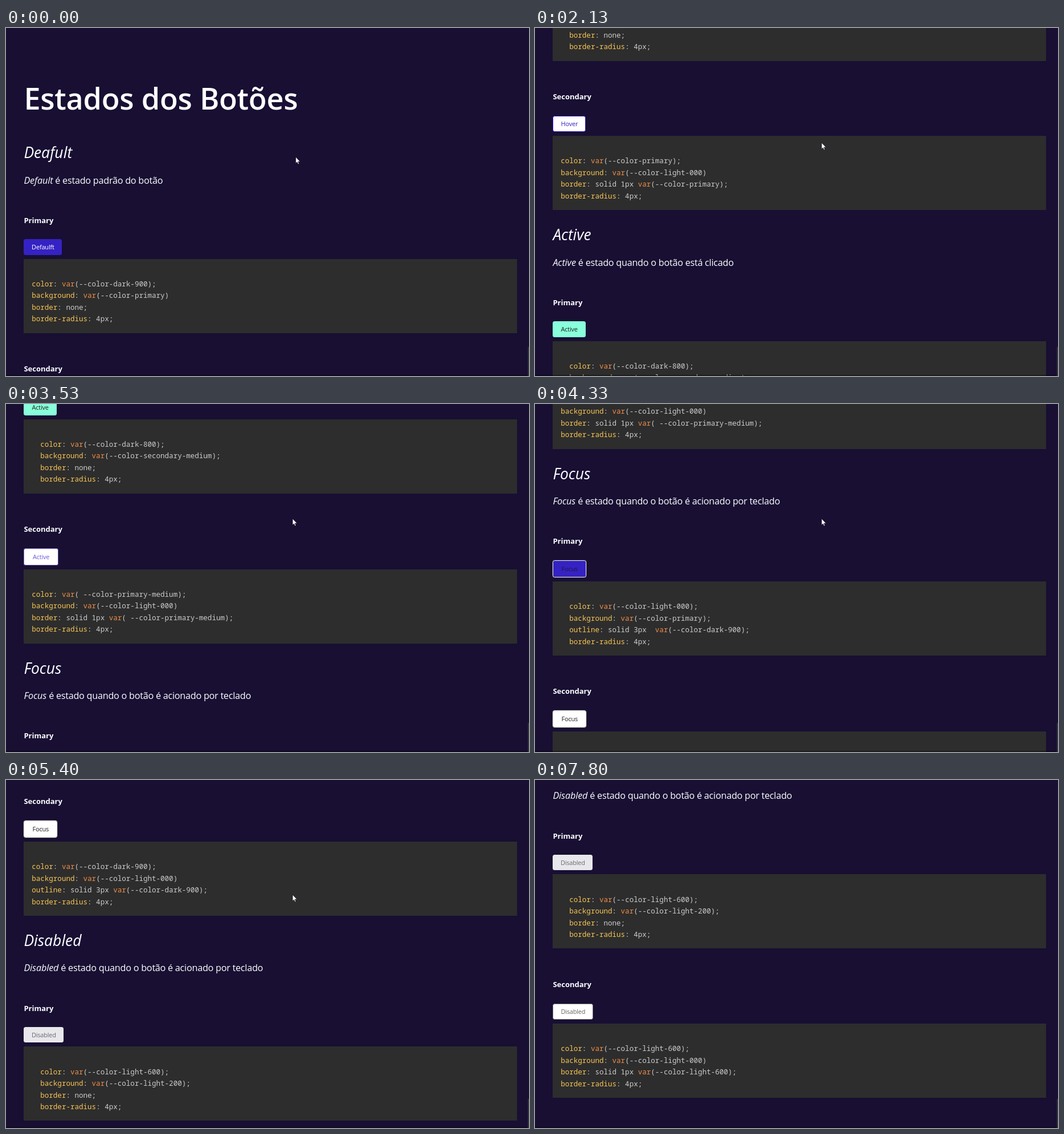
An HTML page for the animation above (8.19 s loop, 918 by 610 pixels).

```html
<!DOCTYPE html>
<html lang="pt">
<head>
<meta charset="utf-8">
<style>
  html, body { margin: 0; width: 100%; height: 100%; overflow: hidden; background: #180f33; }
  body { position: relative; color: #fff; font-family: "Open Sans", "Noto Sans", sans-serif; }
  #page { position: absolute; left: 0; top: 0; width: 918px; }
  #page > * { position: absolute; left: 31.4px; margin: 0; white-space: pre; }
  h1, h2, h3, p { line-height: 40px; }
  h1 { font-size: 52px; font-weight: 600; letter-spacing: -.2px; }
  h2 { font-size: 26.5px; font-weight: 400; font-style: italic; }
  h3 { font-size: 13px; font-weight: 700; }
  p { font-size: 16.2px; letter-spacing: -.25px; }
  p em { letter-spacing: -.1px; }
  .btn { box-sizing: border-box; display: flex; align-items: center; justify-content: center;
    border-radius: 3.5px; font-size: 11px; letter-spacing: -.2px; }
  pre { box-sizing: border-box; width: 866px; height: 130px; padding: 34.3px 0 0 13.8px;
    background: #2d2d2d; color: #ccc; font: 12.55px/20.55px "Noto Sans Mono", monospace; }
  pre b { font-weight: 400; color: #f8c555; }
  pre i { font-style: normal; color: #f08d49; }
  #cursor { position: absolute; left: 0; top: 0; overflow: visible; }
  #floor, #thumb { position: absolute; }
  #floor { left: 0; top: 608px; width: 918px; height: 2px; background: rgba(0, 0, 0, .35); }
  #thumb { left: 916px; top: 559px; width: 2px; height: 51px; background: #34323c; }
</style>
</head>
<body>
<div id="page"></div>
<div id="floor"></div>
<div id="thumb"></div>
<svg id="cursor" width="10" height="15">
  <path d="M0 0V11.2L2.5 8.9 4.2 12.8 6 12 4.3 8.2H7.8Z" fill="#fff" stroke="#0b0718" stroke-width=".7"/>
</svg>
<script>
const page = document.getElementById('page');
const cursor = document.getElementById('cursor');

const add = (tag, top, html, style = '', cls = '') => page.insertAdjacentHTML('beforeend',
  `<${tag} class="${cls}" style="top:${top}px;${style}">${html}</${tag}>`);
// Text line of 40px height, centred on y
const line = (tag, y, html) => add(tag, y - 20, html);

const highlight = code => code
  .replace(/\bvar\b/g, '<i>var</i>')
  .replace(/^( *)([\w-]+)(?=:)/gm, '$1<b>$2</b>');
const rules = (indent, color, background, third) => highlight(
  [`color: ${color}`, `background: ${background}`, third, 'border-radius: 4px;']
    .map(s => ' '.repeat(indent) + s).join('\n'));
const v = name => `var(--color-${name})`;
const light = v('light-000');

const H = 27.4, edge = 'border:1px solid ';
const ring = 'border:1.5px solid #e8e8ea;box-shadow:0 0 0 1px #35343a;';

// Buttons: [width, height, colour, background, extra style]
const sections = [
  { name: 'Default', title: 'Deafult', label: 'Defaulft', text: 'padrão do botão',
    first: [67, H, '#fff', '#3522c4'],
    second: [68, H + 1, '#222', '#fff', edge + '#222'],
    codes: [
      rules(0, v('dark-900') + ';', v('primary'), 'border: none;'),
      rules(0, v('dark-900') + ';', light, `border: solid 1px ${v('dark-900')};`)] },
  { name: 'Hover', text: 'quando o mousse passa por cima do botão',
    first: [57, H, '#fff', '#24a178'],
    second: [58, H + 1, '#3522c4', '#fff', edge + '#3522c4'],
    codes: [
      rules(2, v('dark-900') + ';', v('secondary') + ';', 'border: none;'),
      rules(0, v('primary') + ';', light, `border: solid 1px ${v('primary')};`)] },
  { name: 'Active', text: 'quando o botão está clicado',
    first: [57.5, H, '#222', '#88ffda'],
    second: [60.5, 30, '#6c5cdc', '#fff', 'border:1.7px solid #8276dc;border-color:#8276dc #5d51ac #5d51ac #8276dc;'],
    codes: [
      rules(2, v('dark-800') + ';', v('secondary-medium') + ';', 'border: none;'),
      rules(0, 'var( --color-primary-medium);', light, 'border: solid 1px var( --color-primary-medium);')] },
  { name: 'Focus', text: 'quando o botão é acionado por teclado',
    first: [59, 30, '#1c1836', '#3522c4', ring],
    second: [59, 30, '#222', '#fff', ring],
    codes: [
      rules(2, light + ';', v('primary') + ';', `outline: solid 3px  ${v('dark-900')};`),
      rules(0, v('dark-900') + ';', light, `outline: solid 3px ${v('dark-900')};`)] },
  { name: 'Disabled', text: 'quando o botão é acionado por teclado',
    first: [70, H, '#6a6a70', '#e8e7eb'],
    second: [71, H + 1, '#666', '#fff', edge + '#777'],
    codes: [
      rules(2, v('light-600') + ';', v('light-200') + ';', 'border: none;'),
      rules(0, v('light-600') + ';', light, `border: solid 1px ${v('light-600')};`)] },
];

// Adds label, button and code box; returns the bottom of the box
function sample(y, title, label, [w, h, color, bg, extra = ''], code) {
  line('h3', y, title);
  const top = y + 33.5;
  add('div', top, label, `width:${w}px;height:${h}px;color:${color};background:${bg};${extra}`, 'btn');
  add('pre', top + h + 6.8, code);
  return top + h + 136.8;
}

line('h1', 123.3, 'Estados dos Botões');
let y = 218.3;
for (const s of sections) {
  const label = s.label || s.name;
  line('h2', y, s.title || s.name);
  line('p', y + 48.2, `<em>${s.name}</em> é estado ${s.text}`);
  let end = sample(y + 118.5, 'Primary', label, s.first, s.codes[0]);
  end = sample(end + 62.7, 'Secondary', label, s.second, s.codes[1]);
  y = end + 43.4;
}

// Tracks of [tick, value...] at 15 ticks per second
const scroll = [[0, 0], [1, 192], [2, 198], [10, 198], [16, 698], [24, 698], [25, 748], [32, 1098],
  [37, 1098], [42, 1383.5], [45, 1498], [51, 1498], [53, 1619.5], [59, 1898], [64, 1898], [66, 2023],
  [68, 2098], [69, 2098], [71, 2223], [73, 2298], [78, 2298], [85, 2598], [90, 2598], [91, 2641.5], [94, 2729]];
const pointer = [[0, 508.5, 226], [10, 508.5, 226], [16, 503, 201], [104, 503, 201],
  [108, 400, 285], [112, 190, 450], [116, 22, 600], [117, 22, 620]];

function at(track, k) {
  const i = track.findIndex(p => p[0] > k);
  if (i < 0) return track[track.length - 1].slice(1);
  const a = track[i - 1], b = track[i], f = (k - a[0]) / (b[0] - a[0]);
  return a.slice(1).map((n, j) => n + (b[j + 1] - n) * f);
}

function draw(now) {
  const tick = Math.floor((now % 8190 + 4) * .015);
  const [top] = at(scroll, tick);
  const [px, py] = at(pointer, tick);
  page.style.transform = `translateY(${-Math.round(top)}px)`;
  cursor.style.transform = `translate(${px}px,${py}px)`;
}

const start = performance.now();
(function loop() {
  draw(performance.now() - start);
  requestAnimationFrame(loop);
})();
</script>
</body>
</html>
```
